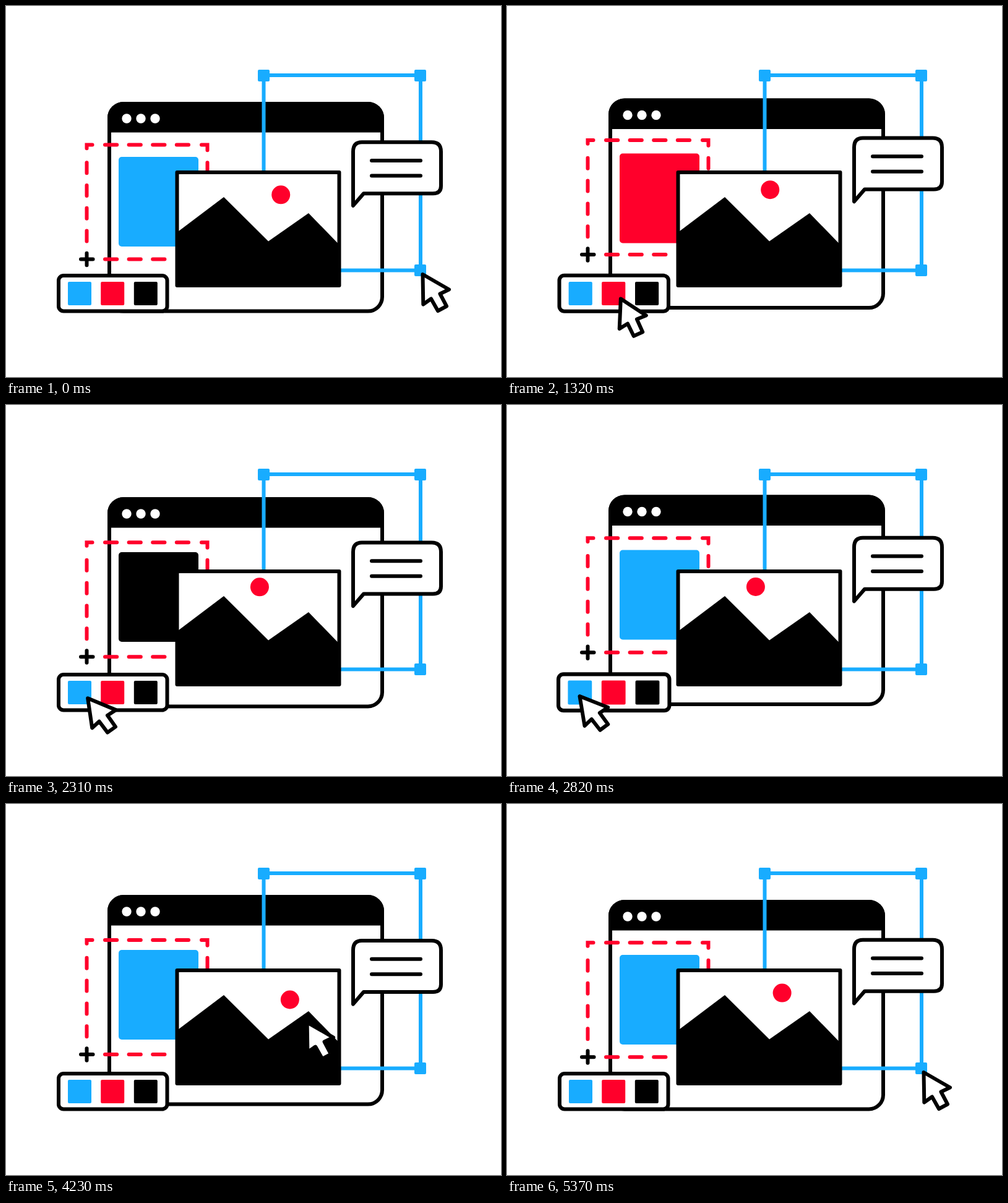
An HTML page that plays this animation: 800 px wide and 600 px high, repeating every 5400 ms.

```html
<!DOCTYPE html>
<html lang="en">
<head>
<meta charset="utf-8">
<title>Design tools</title>
<style>
  html, body { margin: 0; width: 100%; height: 100%; overflow: hidden; background: #fff; }
  svg { display: block; width: 100vw; height: 100vh; }
  .ink { fill: #fff; stroke: #000; stroke-width: 6; stroke-linejoin: round; stroke-linecap: round; }
  .dash { fill: none; stroke: #ff002b; stroke-width: 6; stroke-linecap: round; }
  .blue { fill: #18acff; }
  .red { fill: #ff002b; }
  .frame { fill: none; stroke: #18acff; stroke-width: 6; }
</style>
</head>
<body>
<svg viewBox="0 0 800 600">
  <g id="window">
    <rect class="ink" x="167" y="158" width="441" height="335.5" rx="23"/>
    <path d="M164 204.500V181a26 26 0 0 1 26-26H585a26 26 0 0 1 26 26V204.500Z"/>
    <g fill="#fff">
      <circle cx="195" cy="182" r="7.700"/>
      <circle cx="218" cy="182" r="7.700"/>
      <circle cx="241" cy="182" r="7.700"/>
    </g>
    <rect id="card" x="182" y="244" width="129" height="145" rx="5"/>
  </g>

  <g id="marquee">
    <g class="dash">
      <path d="M130.500 231V225.300H139.500M316 225.300H325.500V234"/>
      <path d="M160 225.300H300" stroke-dasharray="19.200 19.400"/>
      <path d="M130.500 254V384" stroke-dasharray="17 19.800"/>
      <path d="M325.500 254V300" stroke-dasharray="17 19.800"/>
      <path d="M160 410.300H257" stroke-dasharray="19.200 19.400"/>
    </g>
    <path class="ink" d="M121 410.300H140.500M130.500 400.500V420"/>
  </g>

  <rect class="frame" id="frame" x="416.500" y="112"/>
  <g class="blue" id="handles"></g>

  <g>
    <rect class="ink" x="276.500" y="269" width="262" height="183"/>
    <circle class="red" id="sun" r="15"/>
    <path d="M276.500 366L352 309L424 380.500L489 335L538.500 386V452H276.500Z"/>
  </g>

  <g id="bubble">
    <path class="ink" d="M561 326V238.500Q561 223.300 575 223.300H688Q703 223.300 703 238.500V294Q703 306.300 690 306.300H578Z"/>
    <path class="ink" d="M591 253.100H670M591 277.500H670"/>
  </g>

  <g id="palette">
    <rect class="ink" x="85" y="436" width="175.500" height="57.500" rx="8"/>
    <rect class="blue" x="100" y="446" width="38" height="38" rx="2"/>
    <rect class="red" x="153.200" y="446" width="38" height="38" rx="2"/>
    <rect x="206.800" y="446" width="38" height="38" rx="2"/>
  </g>

  <path class="ink" id="cursor" d="M0 0L42.500 24.500L28 31.500L38.500 51.500L24.500 59L13.500 39.500L.8 48.500Z"/>
</svg>

<script>
const LOOP = 5400, BOB = 1800;
const BLUE = '#18acff', RED = '#ff002b', BLACK = '#000';
const $ = id => document.getElementById(id);
const set = (el, attrs) => { for (const k in attrs) el.setAttribute(k, attrs[k]); };
const mix = (a, b, p) => a + (b - a) * p;
const ease = p => (1 - Math.cos(Math.PI * p)) / 2;
const span = (t, from, to) => Math.min(1, Math.max(0, (t - from) / (to - from)));

// Point on a Bezier curve of any degree
function bezier(points, p) {
  while (points.length > 1)
    points = points.slice(1).map((b, i) => [mix(points[i][0], b[0], p), mix(points[i][1], b[1], p)]);
  return points[0];
}

// Eased value from [time, value] pairs
function keyed(keys, t) {
  let value = keys[0][1];
  for (let i = 1; i < keys.length; i++)
    if (t >= keys[i - 1][0]) value = mix(keys[i - 1][1], keys[i][1], ease(span(t, keys[i - 1][0], keys[i][0])));
  return value;
}

// Sun: slow drift along an arc, then dragged back by the cursor
const GRAB = 3540, DROP = 4080;
function arc(t) {
  const a = (45.6 - 0.0112 * ((t - DROP + LOOP) % LOOP)) * Math.PI / 180;
  return [403 + 80.5 * Math.sin(a), 374.5 - 80.5 * Math.cos(a)];
}
const sunStart = arc(GRAB), sunEnd = arc(DROP);
const sunAt = t => t > GRAB && t < DROP
  ? bezier([sunStart, [425, 317], sunEnd], ease(span(t, GRAB, DROP)))
  : arc(t);
const onSun = ([x, y]) => [x + 2, y + 1.7];

const CORNER = [669.5, 427.5];
const REST = [673.5, 434], ON_RED = [165, 465], ON_BLACK = [226.5, 468], ON_BLUE = [117.5, 471];
const moves = [
  { from: 0, to: 780, path: [REST, [760, 495], [400, 500], ON_RED], turn: [0, 5] },
  { from: 1140, to: 1620, path: [ON_RED, [195, 484], ON_BLACK], turn: [5, 0] },
  { from: 1920, to: 2430, path: [ON_BLACK, [175, 486], ON_BLUE], turn: [0, -8.5] },
  { from: 2880, to: GRAB, path: [ON_BLUE, [150, 510], [330, 440], onSun(sunStart)], turn: [-8.5, 0] },
  { from: DROP, to: 4650, path: [onSun(sunEnd), [530, 430], REST], turn: [0, 0] }
];
const clicks = [[900, RED], [1680, BLACK], [2520, BLUE]];
const paletteKeys = [[0, 1], [120, 0.945], [230, 1], [300, 1.022], [480, 1]];
const cursorKeys = [[0, 1], [120, 0.91], [260, 1]];
const resizeKeys = [[4650, 0], [4950, 1], [5340, 0]];

const handles = [0, 1, 2, 3].map(() => {
  const box = document.createElementNS('http://www.w3.org/2000/svg', 'rect');
  set(box, { width: 19, height: 19, rx: 2 });
  return $('handles').appendChild(box);
});

function bob(id, t, delay) {
  const y = -5 * (1 - Math.cos(2 * Math.PI * (t - delay) / BOB));
  set($(id), { transform: `translate(0 ${y})` });
}

function draw(t) {
  bob('window', t, 0);
  bob('marquee', t, 170);
  bob('bubble', t, 340);

  let fill = BLUE, press = 1, squeeze = 1;
  for (const [start, color] of clicks) {
    if (t >= start + 150) fill = color;
    if (t >= start) {
      press = keyed(paletteKeys, t - start);
      squeeze = keyed(cursorKeys, t - start);
    }
  }
  set($('card'), { fill });
  set($('palette'), { transform: `translate(172.7 464.7) scale(${press}) translate(-172.7 -464.7)` });

  const pull = keyed(resizeKeys, t);
  const dx = -17 * pull, dy = -20 * pull;
  const right = CORNER[0] + dx, bottom = CORNER[1] + dy;
  set($('frame'), { width: right + 0.5 - 416.5, height: bottom - 112 });
  handles.forEach((box, i) => set(box, {
    x: (i % 2 ? right : 416.5) - 9.5,
    y: (i < 2 ? 112.5 : bottom) - 9.5
  }));

  const sun = sunAt(t);
  set($('sun'), { cx: sun[0], cy: sun[1] });

  const move = moves.filter(m => t >= m.from).pop();
  const p = ease(span(t, move.from, move.to));
  let [x, y] = bezier(move.path, p);
  if (t > GRAB && t < DROP) [x, y] = onSun(sun);
  set($('cursor'), {
    transform: `translate(${x + dx} ${y + dy}) rotate(${mix(...move.turn, p)}) scale(${squeeze})`
  });
}

const begin = performance.now();
function tick() {
  draw((performance.now() - begin) % LOOP);
  requestAnimationFrame(tick);
}
tick();
</script>
</body>
</html>
```
